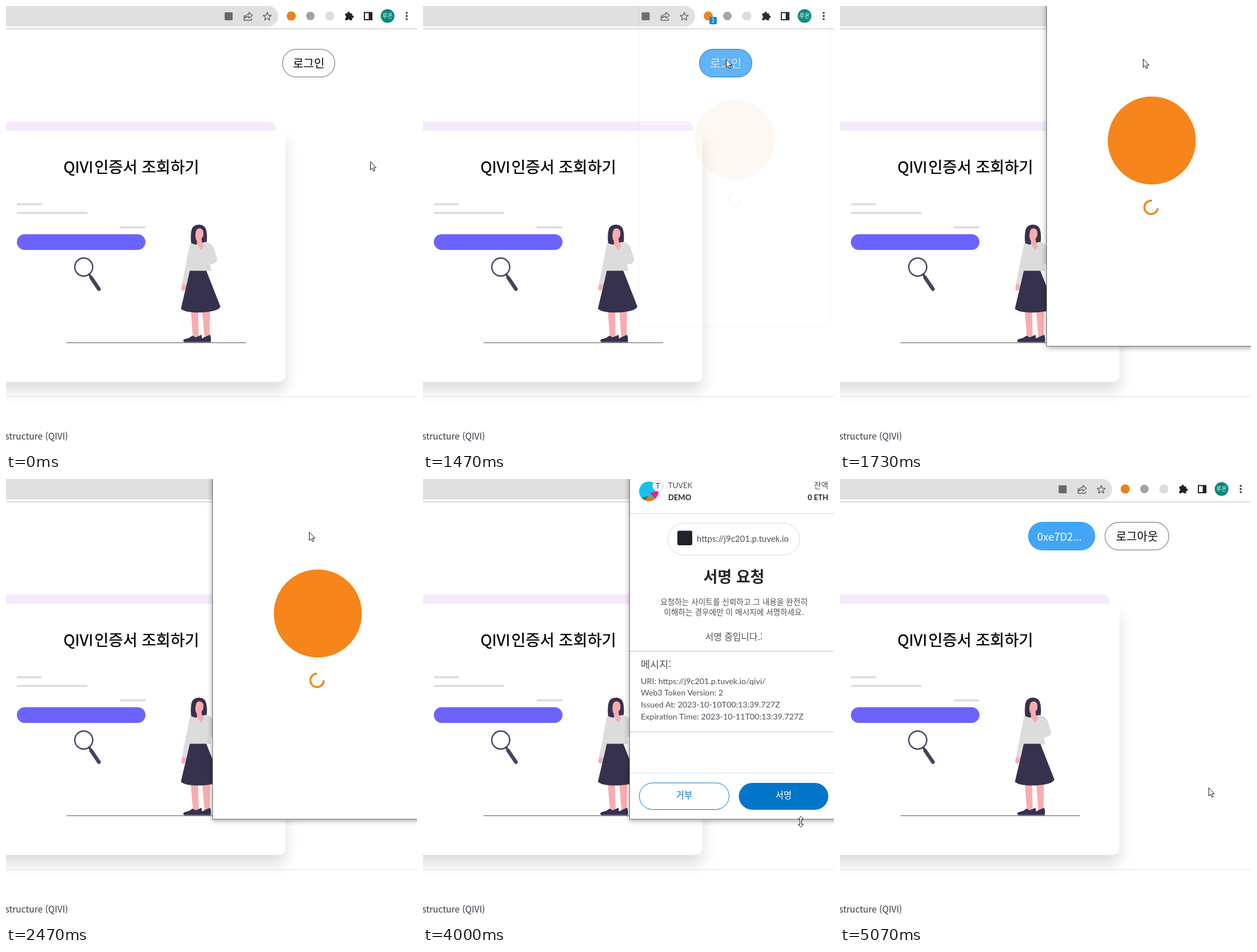
Animation, 719 px wide and 779 px high, one loop 5.14 s. Source, as an HTML page:

```html
<!DOCTYPE html>
<html lang="ko">
<head>
<meta charset="utf-8">
<title>Wallet sign-in</title>
<style>
  html, body { margin: 0; width: 100%; height: 100%; overflow: hidden; background: #fff; }
  svg { display: block; width: 719px; height: 779px; }
  text { font-family: "Noto Sans CJK KR", "Noto Sans CJK", "Noto Sans", sans-serif; }
  .lat { font-family: Lato, "Noto Sans", sans-serif; }
  .mid { text-anchor: middle; }
  .end { text-anchor: end; }
  .card { filter: drop-shadow(0 16px 12px rgba(0,0,0,.13)); }
  .window { filter: drop-shadow(0 2px 5px rgba(0,0,0,.38)); }
</style>
</head>
<body>
<svg viewBox="0 0 719 779">
  <rect width="719" height="779" fill="#fff"/>

  <!-- browser bar -->
  <path d="M0 0H458A18 18 0 0 1 458 36H0Z" fill="#e0e0e0"/>
  <path d="M0 40H719" stroke="#cfcfcf" stroke-width="1.4"/>
  <rect x="382.5" y="11" width="14" height="14" rx="1.5" fill="#66696c"/>
  <g fill="none" stroke="#5f6368" stroke-width="1.4" stroke-linejoin="round">
    <path d="M416.5 16V25H429.500V21.500M418 21C418.500 16.500 421.500 14.500 425 14.500V11L431 16.500L425 21.500V18.200C422 18.200 420 19 418 21Z"/>
    <path d="M457 11.200L459 16L464.200 16.400L460.200 19.700L461.500 24.700L457 22L452.500 24.700L453.800 19.700L449.800 16.400L455 16Z"/>
  </g>
  <circle cx="499" cy="17.500" r="8" fill="#e8821e"/>
  <g id="badge">
    <rect x="501" y="19" width="13" height="13" rx="2" fill="#0b84d8"/>
    <text class="mid" x="507.500" y="29" font-size="10" fill="#fff">1</text>
  </g>
  <circle cx="532.500" cy="17.500" r="7.500" fill="#a3a3a3"/>
  <circle cx="566.500" cy="17.500" r="8" fill="#dcdcdc"/>
  <path d="M593.500 13H597.300A2.300 2.300 0 1 1 601.700 13H605.500V16.500A2.300 2.300 0 1 1 605.500 21V25H601.500A2.300 2.300 0 0 0 597 25H593.500V21A2.300 2.300 0 0 0 593.500 16.600Z" fill="#222"/>
  <rect x="627" y="11.500" width="13" height="12.500" fill="none" stroke="#222" stroke-width="2"/>
  <rect x="634.500" y="11" width="6" height="13" fill="#222"/>
  <circle cx="667.500" cy="17.500" r="12" fill="#00897b"/>
  <text class="mid" x="667.500" y="21" font-size="10" fill="#fff">루온</text>
  <g fill="#333"><circle cx="701" cy="12" r="1.800"/><circle cx="701" cy="17.500" r="1.800"/><circle cx="701" cy="23" r="1.800"/></g>

  <!-- page header -->
  <g id="login">
    <rect id="loginBox" x="483.700" y="75.700" width="91.600" height="48.600" rx="24.300" stroke-width="1.500"/>
    <text id="loginText" class="mid" x="529.500" y="107.500" font-size="20">로그인</text>
  </g>
  <g id="account">
    <rect x="329" y="75" width="117.500" height="50" rx="25" fill="#42a5f5"/>
    <text x="345" y="107.500" font-size="18.500" fill="#fff">0xe7D2...</text>
    <rect x="463.700" y="75.700" width="111.600" height="48.600" rx="24.300" fill="#fff" stroke="#999" stroke-width="1.500"/>
    <text class="mid" x="519.500" y="107.500" font-size="20">로그아웃</text>
  </g>

  <!-- card -->
  <path d="M-20 202H460A12 12 0 0 1 472 214V230H-20Z" fill="#f8ebfe"/>
  <rect class="card" x="-60" y="218.500" width="549" height="439.500" rx="12" fill="#fff"/>
  <g font-size="27.300" font-weight="500" stroke="#000" stroke-width=".4">
    <text x="100.500" y="292">QIVI</text><text x="154.500" y="292">인증서 조회하기</text>
  </g>
  <path d="M20.500 347H61.500M20.500 362.300H141M200.500 387.500H242.500" stroke="#dcdcdd" stroke-width="3.400" stroke-linecap="round"/>
  <rect x="19" y="399.500" width="225" height="27.500" rx="13.700" fill="#6c63ff"/>
  <g fill="none" stroke="#45425f" stroke-linecap="round">
    <circle cx="136" cy="457" r="15.700" stroke-width="2.400"/>
    <path d="M145.500 470L149 475" stroke-width="4"/>
    <path d="M149 475.500L162.500 495.500" stroke-width="6.500"/>
  </g>
  <path d="M106 589.500H420" stroke="#55516a" stroke-width="1.200"/>

  <!-- woman -->
  <path d="M324 416C323 407 323 397 325 391C328 381 344 380 349 389C352 396 352 406 351 414L347 417H327Z" fill="#36324d"/>
  <path d="M309 484L306.500 494C307 498 311 500 313 497L316 486Z" fill="#f9acb0"/>
  <path d="M323 530H336L337 580H327ZM343 530H357L356 579H347Z" fill="#f9acb0"/>
  <path d="M326 577L332 580L342 575.500L343 582L347.500 579.500L357 575.500C359 580 359 585 358 588.500H312C309 587 310 584 313 583C319 582 323 580 326 577Z" fill="#36324d"/>
  <path d="M322 415L333 417L349 413C357 414 362 419 364 426L369 441C370 449 366 452 357 452L359 464H322L314 489L308 486Z" fill="#dcdcdd"/>
  <path d="M332 396C333 388 342 387 345 394C346 400 345 405 342 407L343 414L346.500 420L341.500 427C337 422 334 417 333 410C331 406 331 401 332 396Z" fill="#f9acb0"/>
  <path d="M324 414L334 410L333 418L326 416Z" fill="#36324d"/>
  <path d="M321.500 463.500H350.500L375 526C373 533 357 536 338 536.500C322 537 309 534 306 530Z" fill="#36324d"/>

  <path d="M0 683.700H719" stroke="#e6e6e8" stroke-width="1.200"/>
  <text class="end" x="108.500" y="759" font-size="15.500" fill="#333b48">Infrastructure (QIVI)</text>

  <!-- wallet window -->
  <g id="popup">
    <rect class="window" x="361.500" y="-60" width="367" height="655.500" fill="#fff" stroke="#707070"/>
    <g id="loading">
      <circle cx="545.500" cy="235.500" r="77" fill="#f6851b"/>
      <path id="spinner" d="M556 352.500A11.800 11.800 0 1 1 544.200 340.700" fill="none" stroke="#f6851b" stroke-width="3.400"/>
    </g>
    <g id="request" fill="#4b5259">
      <circle cx="395" cy="21.500" r="17" fill="#18c0f2"/>
      <path d="M397 24L412 21.500A17 17 0 0 1 406 34.500Z" fill="#fb1885"/>
      <path d="M394 30L407 33.500A17 17 0 0 1 388 37Z" fill="#f5700c"/>
      <path d="M382 32.500L394 30L388 37A17 17 0 0 1 382 32.500Z" fill="#03815e"/>
      <circle cx="411" cy="12" r="9.300" fill="#f5f6f8" stroke="#d0d4d8"/>
      <text class="lat mid" x="411" y="17" font-size="14">T</text>
      <g font-size="13">
        <text class="lat" x="429" y="16">TUVEK</text>
        <text class="end" x="709" y="16" font-size="13.600">잔액</text>
        <g fill="#24272a" font-weight="700">
          <text class="lat" x="429" y="37">DEMO</text>
          <text class="lat end" x="709" y="37">0 ETH</text>
        </g>
      </g>
      <rect x="428.500" y="77.500" width="230.500" height="55.500" rx="27.700" fill="#fff" stroke="#d6d9dc"/>
      <rect x="445" y="90.500" width="26" height="25.500" rx="3" fill="#20232a"/>
      <text id="site" class="lat" x="479" y="110" font-size="15"/>
      <text class="mid" x="544" y="181" font-size="27" font-weight="700" fill="#24272a">서명 요청</text>
      <g class="mid" font-size="13.650">
        <text x="544" y="219.500">요청하는 사이트를 신뢰하고 그 내용을 완전히</text>
        <text x="544" y="237.500">이해하는 경우에만 이 메시지에 서명하세요.</text>
        <text x="544" y="282" font-size="15.800">서명 중입니다.:</text>
      </g>
      <text x="381" y="331" font-size="17.500">메시지:</text>
      <g id="message" font-size="14.300"></g>
      <path d="M362 60.500H719M362 515H719" stroke="#d6d9dc"/>
      <path d="M362 301.500H719M362 442.500H719" stroke="#bbc0c5"/>
      <rect x="378.500" y="532" width="157" height="46.500" rx="23.200" fill="#fff" stroke="#0376c9"/>
      <rect id="sign" x="552.500" y="532" width="156.500" height="47" rx="23.500"/>
      <g class="mid" font-size="15.500">
        <text x="457" y="558.500" fill="#0376c9">거부</text>
        <text x="630.700" y="558.500" fill="#fff">서명</text>
      </g>
    </g>
  </g>

  <!-- cursors, each with its hot spot at 0,0 -->
  <g id="cursor" fill="#fff" stroke="#111" stroke-linejoin="round">
    <path id="arrow" d="M0 0V14.500L3.300 11.500L5.500 16.500L7.800 15.500L5.700 10.600H10Z"/>
    <path id="hand" d="M-1.500 1.200C-1.500 -.6 1.300 -.6 1.300 1.200V6.500C2 5.500 4 5.700 4.200 7C5 6.200 6.600 6.500 6.800 7.800C7.800 7.200 9.200 7.800 9.200 9.200V14C9.200 16 8 17 7.500 19.500H0C-.5 17 -3 15 -5 11.500C-5.500 10 -3.500 9 -2.500 10.500L-1.500 11.600ZM1.300 6.500V10M4.200 7V10.500M6.800 7.800V11"/>
    <path id="resize" d="M0 -9.500L4.500 -4.500H1.500V4.500H4.500L0 9.500L-4.500 4.500H-1.500V-4.500H-4.500Z"/>
  </g>
</svg>
<script>
const LOOP = 5140, FPS = 15;
const $ = id => document.getElementById(id);
const clamp = x => Math.max(0, Math.min(1, x));
const span = (t, a, b) => clamp((t - a) / (b - a));
const smooth = p => p * p * (3 - 2 * p);
const mix = (a, b, p) => a + (b - a) * p;
const rgb = (a, b, p) => `rgb(${a.map((v, i) => Math.round(mix(v, b[i], p)))})`;
const show = (id, on) => $(id).setAttribute('display', on ? 'inline' : 'none');

const site = 'https://j9c201.p.tuvek.io';
$('site').textContent = site;
$('message').innerHTML = [
  `URI: ${site}/qivi/`,
  'Web3 Token Version: 2',
  'Issued At: 2023-10-10T00:13:39.727Z',
  'Expiration Time: 2023-10-11T00:13:39.727Z'
].map((s, i) => `<text class="lat" x="381" y="${358.5 + i * 20.7}">${s}</text>`).join('');

// time, x, y of the pointer after it leaves the login button
const path = [
  [3540, 530.5, 93], [3670, 562, 190], [3800, 632, 420], [3870, 661, 535],
  [3930, 668, 588], [4000, 661, 600], [4067, 657, 594], [4133, 651, 568],
  [4200, 646, 547], [4270, 645, 540.5]
];

function pointer(t) {
  if (t < path[0][0]) {
    const p = smooth(span(t, 350, 750));
    return [mix(637.5, 530.5, p), mix(272.5, 93, p)];
  }
  const i = path.findIndex(k => k[0] > t);
  if (i < 0) return path[path.length - 1].slice(1);
  const a = path[i - 1], b = path[i], p = span(t, a[0], b[0]);
  return [mix(a[1], b[1], p), mix(a[2], b[2], p)];
}

function drawLogin(t) {
  const p = span(t, 640, 790) * (1 - span(t, 1450, 1590));
  $('loginBox').setAttribute('fill', rgb([255, 255, 255], [66, 165, 245], p));
  $('loginBox').setAttribute('stroke', rgb([153, 153, 153], [33, 145, 235], p));
  $('loginText').setAttribute('fill', rgb([0, 0, 0], [255, 255, 255], p));
  show('login', t < 4790);
  show('account', t >= 4790);
}

function drawPopup(t) {
  const enter = 1 - span(t, 1460, 1730), leave = span(t, 4810, 5030);
  const scale = (1 - .1 * enter ** 3) * (1 - .08 * leave ** 2);
  show('popup', t > 1460 && leave < 1);
  $('popup').setAttribute('opacity', (1 - enter ** 2) * (1 - leave));
  $('popup').setAttribute('transform',
    `translate(544.5 220) scale(${scale}) translate(-544.5 -220)`);
  show('loading', t < 3060);
  show('request', t >= 3060);
  show('badge', t > 1460 && t < 4790);
  const spin = Math.max(0, t - 1717) / 750 * 360;
  $('spinner').setAttribute('transform', `rotate(${spin} 544.2 352.5)`);
}

function drawCursor(t) {
  const [x, y] = pointer(t);
  const onSign = t > 3600 && t < 4860 && x > 553 && y > 532 && y < 579;
  const onLogin = t > 600 && t < 1460 && y < 124;
  const kind = onSign || onLogin ? 'hand' : t > 3600 && y > 589 ? 'resize' : 'arrow';
  for (const id of ['arrow', 'hand', 'resize']) show(id, id === kind);
  $('cursor').setAttribute('transform', `translate(${x} ${y})`);
  $('sign').setAttribute('fill', onSign && t < 4460 ? '#0370be' : '#0376c9');
}

function draw(ms) {
  const step = Math.min(76, Math.floor((ms % LOOP + 5) * FPS / 1000));
  const t = step * 1000 / FPS;
  drawLogin(t);
  drawPopup(t);
  drawCursor(t);
}

const start = performance.now();
function tick() {
  draw(performance.now() - start);
  requestAnimationFrame(tick);
}
tick();
</script>
</body>
</html>
```
